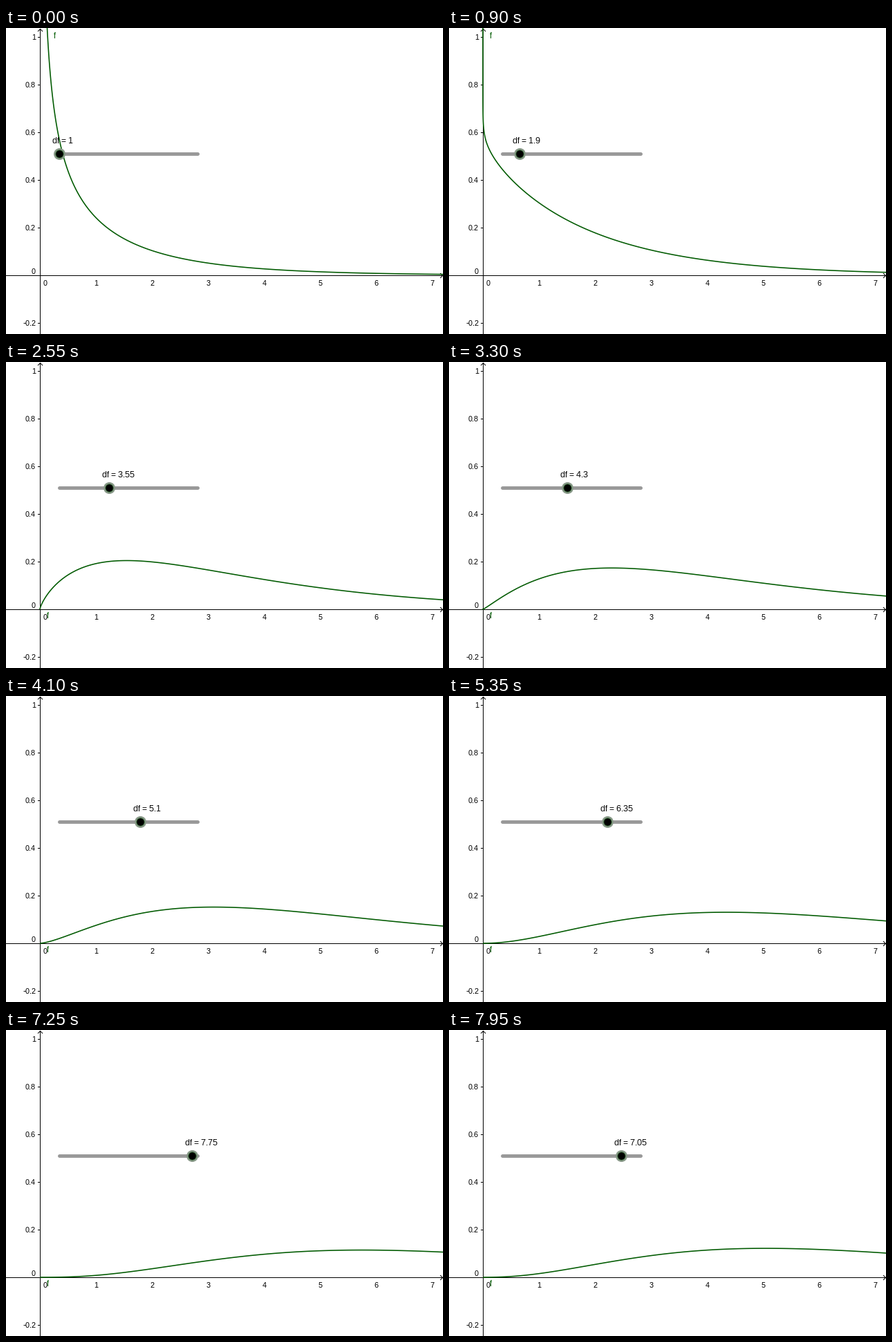
These frames come from a looping animation (632 by 443 pixels, 8000 ms). A matplotlib script:

```python
import math

import numpy as np
import matplotlib.pyplot as plt
from matplotlib.animation import FuncAnimation
from matplotlib.patches import Circle

W, H, DPI = 632, 443, 64
PT = 72 / DPI                      # points per pixel
X0, Y0, UX, UY = 49, 358, 81, 345
GREEN = "#005a00"
BAR_X, BAR_Y, BAR_LEN = 77.5, 182.5, 200
DF_MIN, DF_MAX, STEP = 1, 8, 0.05
FRAMES = 160

plt.rcParams.update({
    "toolbar": "None",
    "font.family": "Liberation Sans",
    "text.hinting": "native",
    "text.hinting_factor": 1,
    "path.simplify": False,
    "path.snap": False,
})

fig = plt.figure(figsize=(W / DPI, H / DPI), dpi=DPI, facecolor="white")
ax = fig.add_axes([0, 0, 1, 1])
ax.set(xlim=(0, W), ylim=(H, 0))
ax.axis("off")


def line(xs, ys, color="black", width=1.0, z=2, **kw):
    kw.setdefault("solid_capstyle", "butt")
    return ax.plot(xs, ys, color=color, lw=width * PT, zorder=z,
                   snap=False, **kw)[0]


def label(x, y, s, size=11, color="black", ha="left", z=3):
    return ax.text(x, y, s, fontsize=size * PT, color=color, ha=ha,
                   va="baseline", zorder=z)


def draw_axes():
    cx, cy = X0 + 0.5, Y0 + 0.5    # centre of the axis pixels
    line([0, W], [cy, cy])
    line([cx, cx], [1, H])
    line([628, 631.5, 628], [cy - 3.5, cy, cy + 3.5])
    line([cx - 3.5, cx, cx + 3.5], [5, 1.5, 5])
    for i in range(-1, 6):
        y = Y0 - i * UY // 5
        if i:
            line([X0 - 3, X0], [y + 0.5, y + 0.5])
        label(43, y + (4 if i else -2), f"{i * 0.2:.1g}", ha="right")
    label(56.5, 373, "0", ha="center")
    for i in range(1, 8):
        label(X0 + i * UX + 0.5, 373, str(i), ha="center")


def chi2(x, df):
    k = df / 2
    return x ** (k - 1) * np.exp(-x / 2) / (2 ** k * math.gamma(k))


# Dense near zero, where the density may be unbounded
xs = np.concatenate([np.geomspace(1e-16, 0.02, 300),
                     np.linspace(0.021, 7.25, 900)])

draw_axes()
curve = line([], [], GREEN, 1.6, 4, solid_joinstyle="round")
name = label(0, 0, "f", 12, GREEN, z=5)
line([BAR_X, BAR_X + BAR_LEN], [BAR_Y, BAR_Y], "#999999", 5, 5,
     solid_capstyle="round")
knob = [ax.add_patch(Circle((0, BAR_Y), r, fc=c, ec="none", zorder=6))
        for r, c in ((8.5, "#8a9a8a"), (6.2, "#3f6e3f"), (5.2, "black"))]
value = label(0, 167, "", 12, z=7)


def slider_value(i):
    span = round((DF_MAX - DF_MIN) / STEP)
    return round(DF_MIN + STEP * (span - abs(i % (2 * span) - span)), 2)


def name_position(df, ys):
    """The name stands beside the first visible point of the curve."""
    first = np.argmax(ys >= 0)
    x = math.floor(X0 + UX * xs[first]) + 10
    return x, 15 if df < 2 else round(ys[first]) + 13


def update(i):
    df = slider_value(i)
    ys = Y0 - UY * chi2(xs, df)
    curve.set_data(X0 + UX * xs, np.maximum(ys, -200))
    name.set_position(name_position(df, ys))
    x = BAR_X + math.floor(BAR_LEN * (df - DF_MIN) / (DF_MAX - DF_MIN))
    for c in knob:
        c.center = (x, BAR_Y)
    value.set_x(x - 10.5)
    value.set_text(f"df = {df:g}")
    return [curve, name, value, *knob]


anim = FuncAnimation(fig, update, frames=FRAMES, interval=50,
                     repeat=True, repeat_delay=0, blit=False)
plt.show()
```
